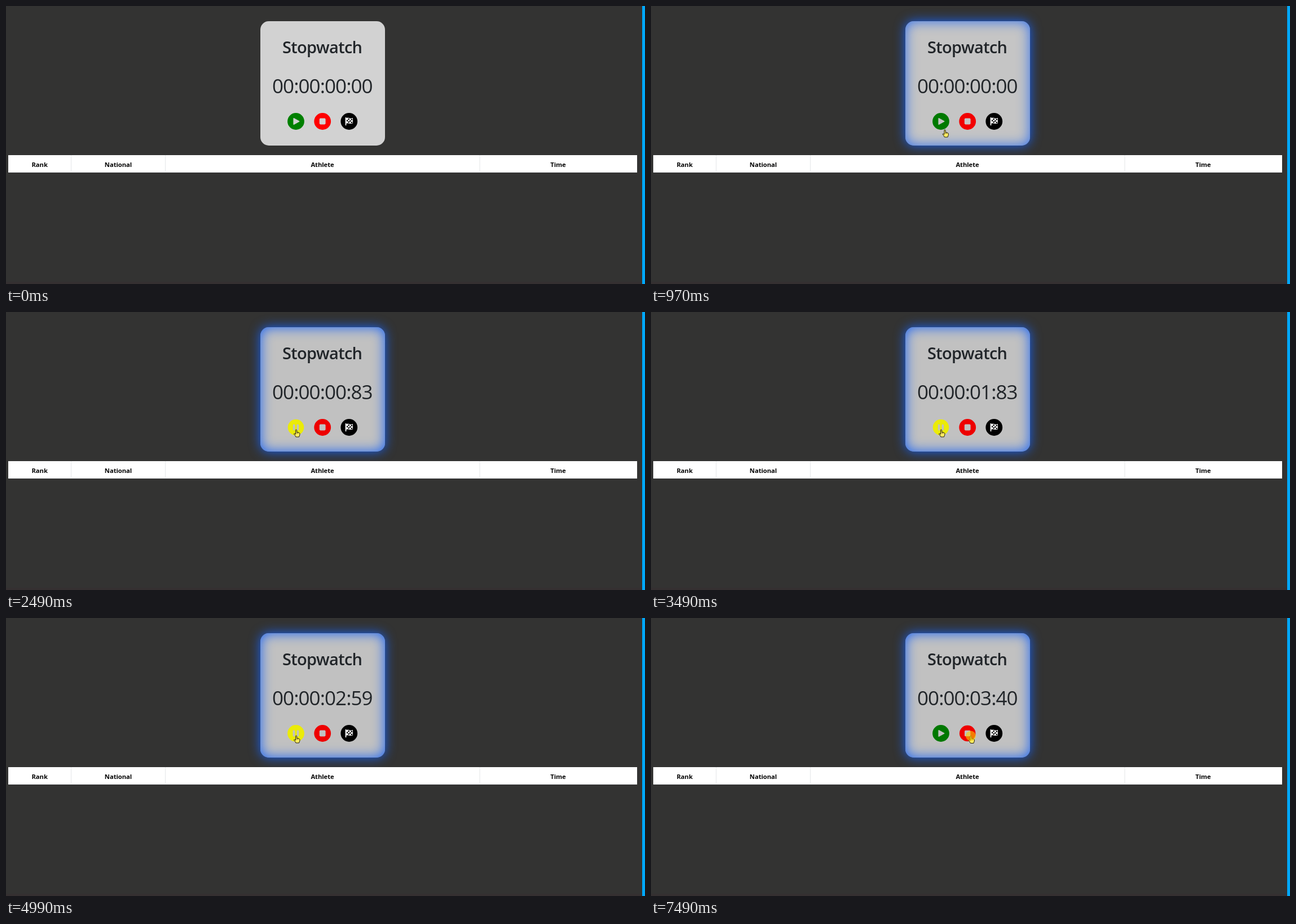
An HTML page with a canvas that plays this animation: 1133 by 494 pixels, repeating every 8000 ms.

```html
<!DOCTYPE html>
<html lang="en">
<head>
<meta charset="utf-8">
<title>Stopwatch</title>
<style>
  html, body { margin: 0; width: 100%; height: 100%; overflow: hidden; background: #333332; }
  #stage { position: relative; width: 1133px; height: 494px; overflow: hidden; }
  #stage > * { position: absolute; box-sizing: border-box; }
  #edge { left: 1128px; top: 0; width: 5px; height: 494px; background: #00a8fb; }
  #floor { left: 0; top: 490px; width: 1128px; height: 4px; background: #353031; }
  #card { left: 451px; top: 26.5px; width: 221px; height: 221px; border-radius: 15px; }
  canvas { left: 0; top: 0; }
</style>
</head>
<body>
<div id="stage">
  <div id="floor"></div>
  <div id="edge"></div>
  <div id="card"></div>
  <canvas id="view" width="1133" height="494"></canvas>
</div>
<script>
const card = document.getElementById('card');
const ctx = document.getElementById('view').getContext('2d');
const LOOP = 8000;
const FONT = '"Open Sans", "Noto Sans", sans-serif';
const INK = '#212529';

// Each step holds until the next one: time, counter in 1/100 s, and what changes.
const steps = [
  { at: 0, cs: 0, glow: 0, run: false, hover: '', pointer: null, click: false },
  { at: 500, pointer: ['arrow', 678, 303] },
  { at: 970, glow: 1, pointer: ['hand', 521, 219.5] },
  { at: 1490, glow: 2, hover: 'play', pointer: ['hand', 514.5, 208.5] },
  { at: 2000, cs: 34, run: true },
  { at: 2490, cs: 83 },
  { at: 2990, cs: 133 },
  { at: 3490, cs: 183 },
  { at: 3990, cs: 233, click: true },
  { at: 4490, cs: 237, run: false, click: false },
  { at: 4990, cs: 259, run: true, hover: '' },
  { at: 5490, cs: 309, hover: 'play' },
  { at: 5990, cs: 340, run: false },
  { at: 6990, hover: 'stop', pointer: ['hand', 567, 209] },
  { at: 7490, click: true }
];

const looks = [
  { face: '#d2d2d2', go: '#008000', pause: '#ffff00', stop: '#ff0000', inset: 0 },
  { face: '#c5c5c5', go: '#007a00', pause: '#f0f000', stop: '#f20000', inset: 0.85 },
  { face: '#c1c1c1', go: '#007800', pause: '#ebeb08', stop: '#ee0000', inset: 1 }
];

function stateAt(t) {
  return Object.assign({}, ...steps.filter(s => s.at <= t));
}

function text(str, x, y, size, weight, color, spacing = 0) {
  ctx.font = `${weight} ${size}px ${FONT}`;
  ctx.letterSpacing = spacing + 'px';
  ctx.textAlign = 'center';
  ctx.fillStyle = color;
  ctx.fillText(str, x + spacing / 2, y);
}

function disc(x, y, r, color) {
  ctx.fillStyle = color;
  ctx.beginPath();
  ctx.arc(x, y, r, 0, Math.PI * 2);
  ctx.fill();
}

function block(x, y, w, h, r, color) {
  ctx.fillStyle = color;
  ctx.beginPath();
  ctx.roundRect(x, y, w, h, r);
  ctx.fill();
}

// Round button; the symbol is drawn around its centre.
function button(x, color, small, symbol) {
  ctx.save();
  ctx.translate(x, 205);
  if (small) ctx.scale(0.96, 0.96);
  disc(0, 0, 14.9, color);
  symbol();
  ctx.restore();
}

function playSymbol(color) {
  ctx.fillStyle = ctx.strokeStyle = color;
  ctx.lineWidth = 2;
  ctx.lineJoin = 'round';
  ctx.beginPath();
  ctx.moveTo(-3.6, -5);
  ctx.lineTo(5.4, 0);
  ctx.lineTo(-3.6, 5);
  ctx.closePath();
  ctx.fill();
  ctx.stroke();
}

function pauseSymbol(color) {
  block(-5.4, -5.4, 3.7, 10.8, 1.2, color);
  block(1.7, -5.4, 3.7, 10.8, 1.2, color);
}

function flagSymbol() {
  block(-6.6, -7.2, 1.7, 14.6, 0.8, '#fff');
  ctx.fillStyle = '#fff';
  ctx.beginPath();
  ctx.moveTo(-5.5, -5.7);
  ctx.bezierCurveTo(-1, -8, 1.5, -3.6, 6.6, -6.2);
  ctx.lineTo(6.6, 3.2);
  ctx.bezierCurveTo(1.5, 5.8, -1, 1.6, -5.5, 3.8);
  ctx.fill();
  ctx.fillStyle = '#000';
  for (let row = 0; row < 3; row++) {
    for (let col = 0; col < 4; col++) {
      if ((row + col) % 2) {
        const wave = col < 2 ? -0.4 : 0.3;
        ctx.fillRect(-4.4 + col * 2.6, -4.7 + row * 2.6 + wave, 2.4, 2.3);
      }
    }
  }
}

function outline(points, fill, line) {
  ctx.beginPath();
  points.forEach(([x, y]) => ctx.lineTo(x, y));
  ctx.closePath();
  ctx.fillStyle = fill;
  ctx.fill();
  ctx.strokeStyle = line;
  ctx.lineWidth = 1;
  ctx.lineJoin = 'round';
  ctx.stroke();
}

function drawPointer([kind, x, y]) {
  ctx.save();
  ctx.translate(x, y);
  if (kind === 'arrow') {
    outline([[0.5, 0.5], [0.5, 8.5], [2.4, 6.9], [3.6, 9.5], [4.8, 8.9], [3.7, 6.4], [6.3, 6.2]],
      '#ffee80', '#222');
  } else {
    outline([[-1, 1], [0, 0.4], [1, 1], [1.2, 5], [3.2, 5.3], [5, 6], [6.4, 7], [6.3, 10],
      [5, 13.5], [-0.6, 13.5], [-2, 10.8], [-4, 8.3], [-3.2, 7.3], [-1, 8.8]],
      '#ffec62', '#211e0c');
    ctx.beginPath();
    for (const px of [1.2, 3.2]) {
      ctx.moveTo(px, 5.2);
      ctx.lineTo(px, 7.6);
    }
    ctx.lineWidth = 0.7;
    ctx.stroke();
  }
  ctx.restore();
}

function drawTable() {
  ctx.fillStyle = '#fff';
  ctx.fillRect(4, 265, 1115, 31);
  ctx.fillStyle = '#e4e6e8';
  for (const x of [115, 282, 839.5]) ctx.fillRect(x, 265, 1, 31);
  ctx.fillRect(4, 295, 1115, 1);
  const heads = [['Rank', 59.7], ['National', 199], ['Athlete', 561], ['Time', 979]];
  for (const [name, x] of heads) text(name, x, 285.5, 11.3, 700, '#050505', -0.1);
}

function clock(cs) {
  const two = n => String(n).padStart(2, '0');
  const s = Math.floor(cs / 100);
  return [Math.floor(s / 3600), Math.floor(s / 60) % 60, s % 60, cs % 100].map(two).join(':');
}

function draw(t) {
  const s = stateAt(t);
  const look = looks[s.glow];
  card.style.background = look.face;
  card.style.boxShadow = s.glow
    ? `0 0 20px rgb(24,98,245), inset 0 0 22px rgba(24,98,245,${look.inset})`
    : 'none';

  ctx.clearRect(0, 0, 1133, 494);
  text('Stopwatch', 561, 84, 29, 600, INK, -0.65);
  text(clock(s.cs), 561.3, 155, 35, 400, INK, -0.95);

  button(514, s.run ? look.pause : look.go, s.hover === 'play',
    () => (s.run ? pauseSymbol : playSymbol)(look.face));
  button(561.2, look.stop, s.hover === 'stop', () => block(-5.4, -5.4, 10.8, 10.8, 1.8, look.face));
  button(608.3, '#000', false, flagSymbol);
  drawTable();

  if (s.pointer) {
    drawPointer(s.pointer);
    if (s.click) disc(s.pointer[1], s.pointer[2] + 0.5, 9, 'rgba(250,205,0,0.6)');
  }
}

function tick() {
  draw(performance.now() % LOOP);
  requestAnimationFrame(tick);
}
draw(0);
tick();
</script>
</body>
</html>
```
